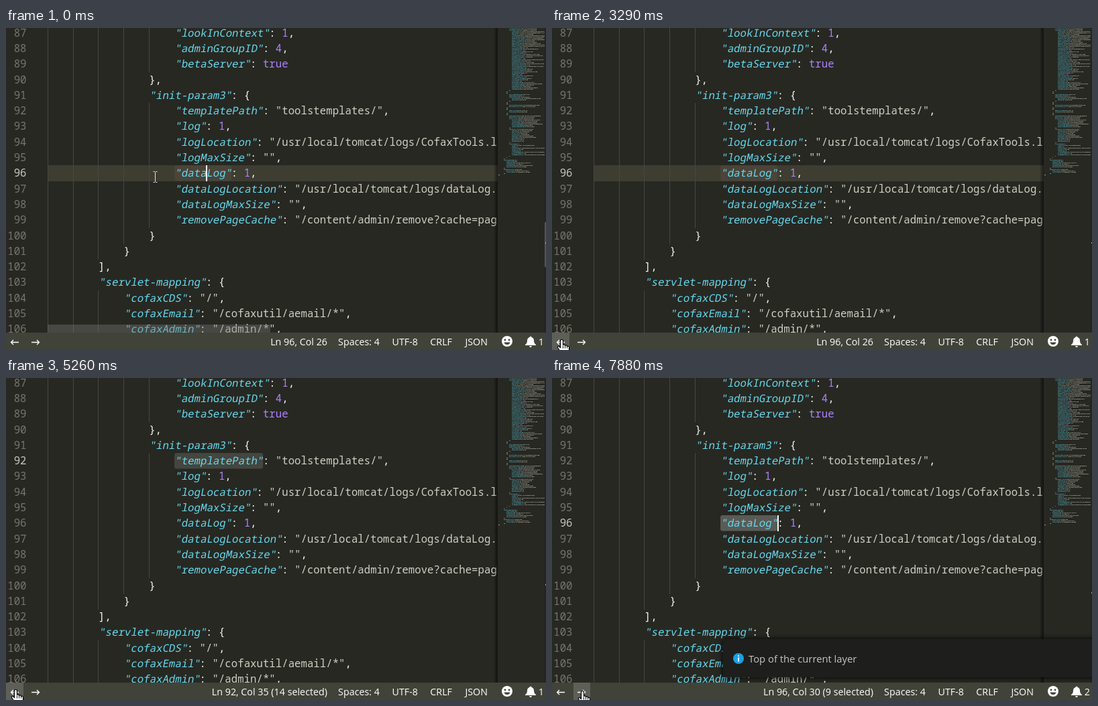
Write an HTML page with a canvas that moves like this. It is 805 by 481 pixels and loops after 8000 ms.

```html
<!DOCTYPE html>
<html lang="en">
<head>
<meta charset="utf-8">
<title>Editor selection history</title>
<style>
html, body { margin: 0; width: 100%; height: 100%; overflow: hidden; background: #272822; }
canvas { display: block; }
</style>
</head>
<body>
<canvas id="stage" width="805" height="481"></canvas>
<script>
const LOOP = 8000, FIRST = 87, LINE_H = 23.3, CHAR_W = 9.43, LEFT = 62.3, EDGE = 733;
const BG = '#272822', BAR = '#414339', KEY = '#66d9ef', STR = '#cfcfc2', NUM = '#ae81ff', FG = '#f8f8f2';
const MONO = '15.72px "Noto Sans Mono", "DejaVu Sans Mono", monospace';
const ui = size => `${size}px "Open Sans", "Noto Sans", sans-serif`;

const code = `
                    "lookInContext": 1,
                    "adminGroupID": 4,
                    "betaServer": true
                },
                "init-param3": {
                    "templatePath": "toolstemplates/",
                    "log": 1,
                    "logLocation": "/usr/local/tomcat/logs/CofaxTools.log",
                    "logMaxSize": "",
                    "dataLog": 1,
                    "dataLogLocation": "/usr/local/tomcat/logs/dataLog.log",
                    "dataLogMaxSize": "",
                    "removePageCache": "/content/admin/remove?cache=pages&id=",
                }
            }
        ],
        "servlet-mapping": {
            "cofaxCDS": "/",
            "cofaxEmail": "/cofaxutil/aemail/*",
            "cofaxAdmin": "/admin/*",`.slice(1).split('\n');
code[12] = code[12].replace(/,$/, '');

// [time, line, editor has focus]; a line change selects that line's key
const steps = [
  [0, 96, 1], [3290, 96, 0], [3430, 95, 1], [3880, 95, 0], [4010, 94, 1], [4440, 94, 0],
  [4570, 93, 1], [4850, 93, 0], [4980, 92, 1], [5260, 92, 0], [5400, 92, 1], [6620, 92, 0],
  [6770, 93, 1], [7070, 94, 1], [7350, 94, 0], [7470, 95, 1], [7740, 95, 0], [7880, 96, 1]];
const blinks = [140, 670, 1130, 1610, 2090, 2600, 3140, 3430, 5930, 6370];
// [time, x, y, pointer shape]
const moves = [
  [0, 222, 222, 'beam'], [1130, 217, 228, 'beam'], [1250, 207, 246, 'beam'], [1370, 194, 266, 'beam'],
  [1490, 181, 285, 'beam'], [1610, 168, 304, 'beam'], [1730, 152, 330, 'beam'], [1850, 136, 357, 'beam'],
  [1970, 115, 390, 'beam'], [2090, 92, 421, 'beam'], [2210, 68, 454, 'beam'], [2350, 46, 459, 'arrow'],
  [2470, 35, 461, 'arrow'], [2600, 28, 462, 'arrow'], [2740, 19, 465, 'hand'], [2870, 14, 466, 'hand'],
  [6080, 24, 467, 'hand'], [6240, 33, 467, 'hand'], [6370, 45, 468, 'hand']];
const pointers = {
  beam: new Path2D('M-3-8H-1L0-7 1-8H3M0-7V7M-3 8H-1L0 7 1 8H3'),
  arrow: new Path2D('M0 0V16L3.7 12.6 6.3 18.6 9 17.5 6.4 11.7H11.5Z'),
  hand: new Path2D('M-2 1Q-2-1 0-1Q2-1 2 1V7Q4 5 5 8Q7 6 8 9Q11 8 11 11V15Q11 18 9 21H0Q-3 15-6 11Q-6 8-4 9L-2 11Z')
};
const arrows = new Path2D('M19 469.5H8M11 466 7.5 469.5 11 473M38 469.5H49M46 466 49.5 469.5 46 473');
const bell = new Path2D('M782 460.5Q783.5 460.5 783.5 462Q787 463 787 467Q787 471 790 473V474H774V473Q777 471 777 467Q777 463 780.5 462Q780.5 460.5 782 460.5ZM780 475H784Q783.5 477 782 477Q780.5 477 780 475Z');
const smile = new Path2D('M742.5 469.5Q743.5 473 747 473Q750.5 473 751.5 469.5Z');

const ctx = stage.getContext('2d');
const at = (list, t) => list.findLast(s => s[0] <= t);
const top0 = n => 205.3 + (n - 96) * LINE_H;
const colX = c => LEFT + c * CHAR_W;
const fill = (g, color, ...box) => { g.fillStyle = color; g.fillRect(...box); };

function disc(g, color, x, y, r) {
  g.fillStyle = color;
  g.beginPath();
  g.arc(x, y, r, 0, 7);
  g.fill();
}

function round(color, x, y, w, h) {
  ctx.fillStyle = color;
  ctx.beginPath();
  ctx.roundRect(x, y, w, h, 3);
  ctx.fill();
}

function tokens(text) {
  return [...text.matchAll(/("[^"]*")(?=:)|"[^"]*"|\w+|\S/g)].map(m => ({
    text: m[0], col: m.index, key: !!m[1],
    color: m[1] ? KEY : m[0][0] === '"' ? STR : /\w/.test(m[0]) ? NUM : FG
  }));
}

function mono(g, text, x, y, slant = 0) {
  g.font = MONO;
  [...text].forEach((ch, i) => {
    g.setTransform(1, 0, -slant, 1, x + i * CHAR_W, y);
    g.fillText(ch, 0, 0);
  });
  g.resetTransform();
}

function layer(paint) {
  const c = document.createElement('canvas');
  c.width = 805;
  c.height = 481;
  paint(c.getContext('2d'));
  return c;
}

const textLayer = layer(g => {
  g.beginPath();
  g.rect(0, 0, EDGE - 1, 481);
  g.clip();
  code.forEach((text, i) => {
    const y = Math.round(top0(FIRST + i)), indent = text.search(/\S/);
    for (let c = 0; c < indent; c += 4) fill(g, '#464741', Math.round(colX(c) - .3), y, 1, 24);
    for (const k of tokens(text)) {
      g.fillStyle = k.color;
      mono(g, k.text, colX(k.col) + (k.key ? .6 : 0), y + 17, k.key ? .18 : 0);
    }
  });
});

const mapLayer = layer(g => {
  let seed = 7;
  const rnd = () => (seed = seed * 16807 % 2147483647) / 2147483647;
  const word = (min, span) => `"${'x'.repeat(min + rnd() * span)}"`;
  const levels = [[4, 3], [5, 44], [4, 1], [3, 2], [4, 3], [5, 2], [4, 1], [3, 2], [4, 2], [3, 2], [4, 2],
    [3, 2], [4, 3], [5, 6], [4, 2], [5, 9], [4, 2], [5, 8], [4, 1], [3, 1], [2, 2], [3, 5], [2, 2], [3, 2], [2, 1], [0, 1]]
    .flatMap(([level, count]) => Array(count).fill(level));
  levels.forEach((level, i) => {
    const n = i + 4, bracket = level < levels[i - 1] || level === 3 && n < 102;
    const value = n > 18 && n < 48 && rnd() < .5 ? '100' : word(4, n < 20 ? 36 : 20);
    const text = code[n - FIRST] || ' '.repeat(level * 4) + (bracket ? '},' : `${word(7, 14)}: ${value},`);
    for (const k of tokens(text)) {
      [...k.text].forEach((_, j) => {
        const x = 734 + k.col + j;
        g.globalAlpha = .25 + rnd() * .35;
        if (x < 803) fill(g, k.color, x, 197 + (n - 103) * 2, 1, 1);
      });
    }
  });
  g.globalAlpha = 1;
  const shade = g.createLinearGradient(727, 0, EDGE, 0);
  shade.addColorStop(0, '#0000');
  shade.addColorStop(1, '#0008');
  fill(g, shade, 727, 0, 6, 455);
  fill(g, '#0003', 803, 0, 1, 455);
});

function toast(t) {
  const p = Math.min(1, (t - 5400) / 400);
  if (p <= 0) return;
  ctx.save();
  ctx.globalAlpha = p;
  ctx.translate(0, 58 * (1 - p) ** 2);
  ctx.shadowColor = '#000';
  ctx.shadowBlur = 8;
  fill(ctx, '#1e1f1c', 255, 390, 570, 57);
  ctx.shadowBlur = 0;
  disc(ctx, '#1ba1e2', 278, 419, 8);
  fill(ctx, '#fff', 277, 414, 2, 2);
  fill(ctx, '#fff', 277, 417.5, 2, 6);
  ctx.fillStyle = '#c5c5c5';
  ctx.font = ui(14.8);
  ctx.fillText('Top of the current layer', 293, 425);
  ctx.restore();
}

function statusBar(t, position, mouseX) {
  fill(ctx, BAR, 0, 455, 805, 26);
  if (t >= 2740) {
    if (mouseX < 26) fill(ctx, '#5e6057', 0, 455, 26, 26);
    else if (mouseX >= 32) fill(ctx, '#5e6057', 32, 455, 25, 26);
  }
  ctx.strokeStyle = ctx.fillStyle = '#fff';
  ctx.lineWidth = 1.3;
  ctx.stroke(arrows);
  ctx.font = ui(14.3);
  ctx.textAlign = 'right';
  const items = [[479, position], [557, 'Spaces: 4'], [614, 'UTF-8'], [665, 'CRLF'], [718, 'JSON'], [802, t < 5400 ? '1' : '2']];
  for (const [x, text] of items) ctx.fillText(text, x, 473.5);
  ctx.textAlign = 'left';
  ctx.fill(bell);
  disc(ctx, '#fff', 747, 468, 8);
  disc(ctx, BAR, 744, 466, 1.4);
  disc(ctx, BAR, 750, 466, 1.4);
  ctx.fill(smile);
}

function pointer(x, y, shape) {
  ctx.save();
  ctx.translate(x + .5, y + .5);
  ctx.lineJoin = 'round';
  if (shape === 'beam') {
    ctx.lineWidth = 1;
    ctx.strokeStyle = '#e8e8e8';
  } else {
    ctx.fillStyle = '#fff';
    ctx.fill(pointers[shape]);
    ctx.lineWidth = 1.2;
    ctx.strokeStyle = '#000';
  }
  ctx.stroke(pointers[shape]);
  if (shape === 'hand') {
    for (const dx of [2, 5, 8]) fill(ctx, '#000', dx - .5, 8, 1, 4);
  }
  ctx.restore();
}

function draw(t) {
  const [, line, focus] = at(steps, t), [, x, y, shape] = at(moves, t);
  const selected = t >= 3430, rowY = Math.round(top0(line));
  const length = tokens(code[line - FIRST])[0].text.length;
  const column = selected ? 21 + length : 26;

  fill(ctx, BG, 0, 0, 805, 481);
  if (!selected) fill(ctx, '#3e3d32', 62, rowY, EDGE - 62, 24);
  const mark = !selected ? '#4a4439' : focus ? '#5a5b56' : '#44463f';
  round(mark, colX(20) + .2, rowY, length * CHAR_W, 23.5);
  ctx.drawImage(textLayer, 0, 0);

  for (let n = FIRST; n <= 106; n++) {
    ctx.fillStyle = n === line ? '#c8c8c4' : '#75766c';
    mono(ctx, String(n), 30.5 - String(n).length * CHAR_W, Math.round(top0(n)) + 17);
  }
  const caretOn = blinks.filter(b => b <= t).length % 2 === 0;
  if (focus && caretOn) fill(ctx, FG, Math.round(colX(column - 1)), rowY, 2, 24);

  // The scrollbars fade once the pointer has left the editor
  ctx.globalAlpha = t < 2470 ? 1 : Math.max(0, 1 - (t - 2470) / 670);
  fill(ctx, '#79797966', 62, 443, 332, 12);
  ctx.globalAlpha = 1;
  ctx.drawImage(mapLayer, 0, 0);
  if (t < 2470) fill(ctx, '#55564f', 803, 290, 2, 67);
  fill(ctx, '#b0b0aa', 804, 320 + (line - 96) * 3, 1, 2);

  toast(t);
  const count = selected ? ` (${length} selected)` : '';
  statusBar(t, `Ln ${line}, Col ${column}${count}`, x);
  pointer(x, y, shape);
}

const start = performance.now();
function tick() {
  draw((performance.now() - start) % LOOP);
  requestAnimationFrame(tick);
}
tick();
</script>
</body>
</html>
```
